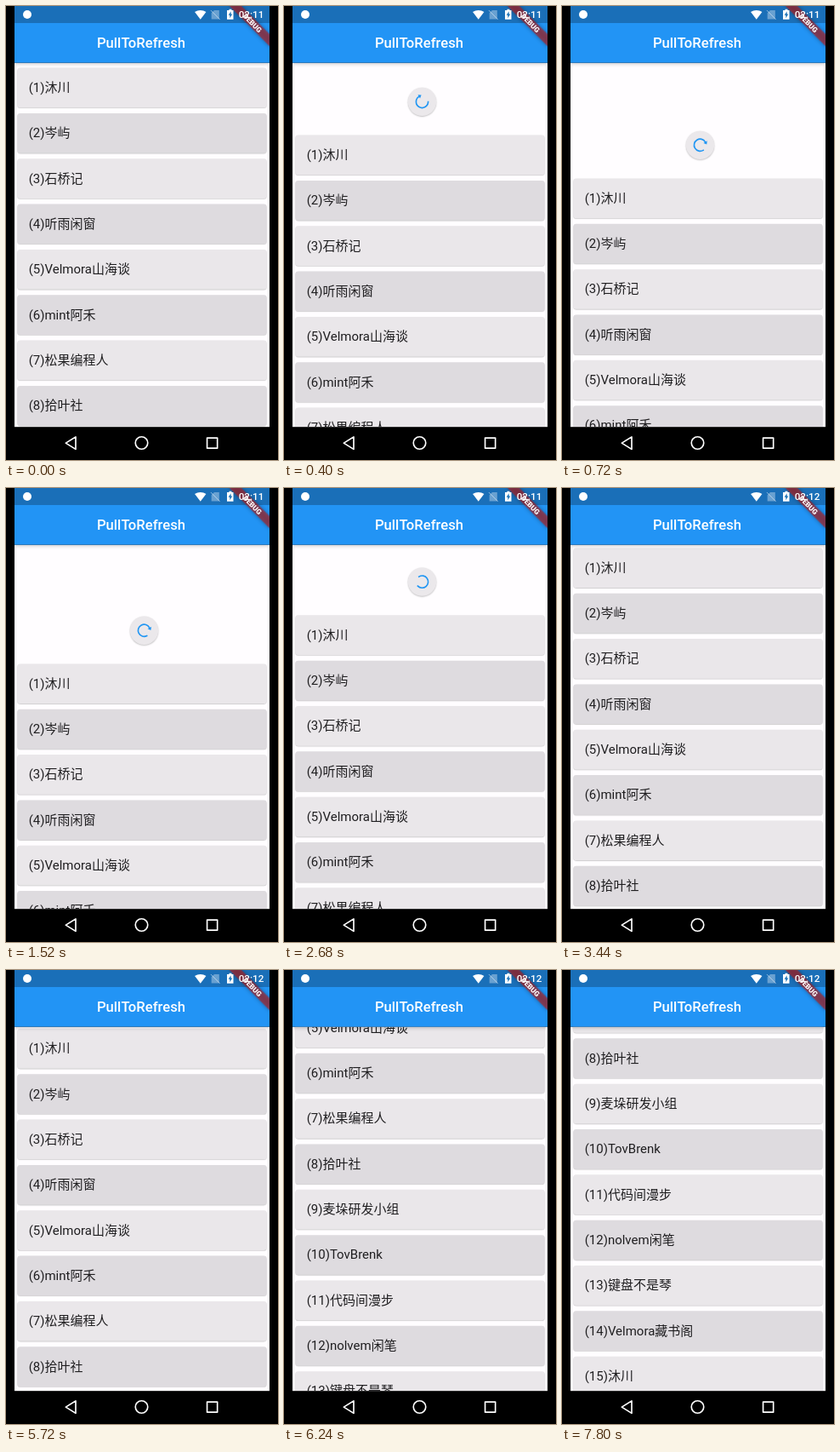
These frames come from a looping animation (320 by 533 pixels, 8000 ms). An HTML page:

```html
<!DOCTYPE html>
<html lang="zh-CN">
<head>
<meta charset="utf-8">
<title>PullToRefresh</title>
<style>
html, body { margin: 0; width: 100%; height: 100%; overflow: hidden; background: #000; }
/* 360 x 640 logical pixels shown at 5/6 scale */
#phone { position: absolute; left: 10px; top: 0; width: 360px; height: 640px; overflow: hidden;
  transform: scale(.833333); transform-origin: 0 0; background: #000;
  font-family: Roboto, "Noto Sans CJK SC", "Noto Sans CJK", "Noto Sans CJK JP", sans-serif; }
#view { position: absolute; top: 80px; width: 360px; height: 512.8px; overflow: hidden; background: #fffdff; }
#list { position: absolute; width: 100%; }
.card { height: 56px; margin: 4px 4px 8px; border-radius: 4px; background: #eae7ea; color: #1f1e20;
  box-shadow: 0 1px 1px #0002, 0 1px 2px #0001;
  padding-left: 16px; font-size: 18px; line-height: 56px; white-space: nowrap; }
.card:nth-child(even) { background: #dedbdf; }
#disc { position: absolute; left: 163.2px; top: -63.3px; width: 40px; height: 40px; border-radius: 50%;
  background: #ebe8eb; box-shadow: 0 1px 2px #0003, 0 1px 3px #0001; }
#bar { position: absolute; width: 360px; height: 56.4px; padding-top: 24px; background: #2294f5; color: #fff;
  font: 500 20px/56px Roboto, sans-serif; text-align: center; text-indent: -2.4px;
  box-shadow: 0 2px 4px #0002, 0 1px 8px #0002; }
svg { position: absolute; left: 0; top: 0; }
</style>
</head>
<body>
<div id="phone">
  <div id="view">
    <div id="list"></div>
    <div id="disc"><svg width="40" height="40" fill="none" stroke="#2196f3" stroke-width="2">
      <path id="arc" stroke-linecap="square"/><path id="head" fill="#2196f3" stroke="none"/>
    </svg></div>
  </div>
  <div id="bar">PullToRefresh</div>
  <svg width="360" height="640" fill="#fff">
    <rect width="360" height="24" fill="#000" opacity=".25"/>
    <g transform="translate(360) rotate(45)">
      <rect x="-40" y="28" width="80" height="12" fill="#b71c1c" fill-opacity=".63" style="filter:drop-shadow(0 0 3px #0008)"/>
      <text y="37.6" font-size="10.2" font-weight="900" text-anchor="middle">DEBUG</text>
    </g>
    <circle cx="18" cy="12" r="6"/>
    <path d="M262.5 19 270.5 8.5C266 5 259 5 254.5 8.5Z"/>
    <path d="M282 6H289V18.5H278V10Z" opacity=".35"/>
    <path d="M277 6 290 19" stroke="#fff" stroke-width="1.2" opacity=".5"/>
    <path d="M303 4.5H306.5V6H309V19H300V6H303Z"/>
    <path d="M305.5 7.5 302 13H304V17L307.5 11.5H305.5Z" fill="#1971b6"/>
    <text id="clock" x="352" y="17" font-size="14" font-weight="500" text-anchor="end"></text>
    <g fill="none" stroke="#fff" stroke-width="2" stroke-linejoin="round" transform="translate(-.6)">
      <path d="M87 607V624.5L73 615.7Z"/>
      <circle cx="180" cy="615.6" r="8.7"/>
      <rect x="272.5" y="608.5" width="14.5" height="14.5"/>
    </g>
  </svg>
</div>
<script>
const $ = id => document.getElementById(id);
const names = ['沐川', '岑屿', '石桥记', '听雨闲窗', 'Velmora山海谈', 'mint阿禾', '松果编程人', '拾叶社',
  '麦垛研发小组', 'TovBrenk', '代码间漫步', 'nolvem闲笔', '键盘不是琴', 'Velmora藏书阁', '沐川'];
names.forEach((name, i) => {
  const card = document.createElement('div');
  card.className = 'card';
  card.textContent = `(${i + 1})${name}`;
  $('list').append(card);
});

const LOOP = 8000, RELEASE = 1525, DONE = 3000, FULL_PULL = 136;
const linear = p => p;
const out = p => 1 - (1 - p) ** 2;
const outCubic = p => 1 - (1 - p) ** 3;
const inOut = p => p * p * (3 - 2 * p);

// time, list offset in stage pixels, easing towards that point
const keys = [
  [0, 2.4], [400, 81.3, linear], [840, 136.5, out], [1520, 136.7, linear],
  [2160, 79.3, outCubic], [3160, 79.3, linear], [3440, .4, inOut],
  [5680, .4, linear], [5720, -.2, linear], [6280, -240, out],
  [7520, -240, linear], [7800, -363, out], [LOOP, -363, linear]
];

function offsetAt(t) {
  const i = keys.findIndex(k => k[0] > t);
  const [t0, y0] = keys[i - 1], [t1, y1, ease] = keys[i];
  return y0 + (y1 - y0) * ease((t - t0) / (t1 - t0));
}

// cubic-bezier(.4, 0, .2, 1)
function fastOutSlowIn(x) {
  let lo = 0, hi = 1, s;
  for (let i = 0; i < 24; i++) {
    s = (lo + hi) / 2;
    if (1.2 * s * (1 - s) ** 2 + .6 * s * s * (1 - s) + s ** 3 < x) lo = s; else hi = s;
  }
  return 3 * s * s * (1 - s) + s ** 3;
}

const clamp = x => Math.min(1, Math.max(0, x));

function drawSpinner(t, offset) {
  const pulling = t < RELEASE;
  const pull = clamp(offset / FULL_PULL);
  const cycle = pulling ? pull / 2 : .5 + (Math.min(t, DONE) - RELEASE) / 1333;
  const step = Math.floor(cycle), p = cycle - step;
  const grow = fastOutSlowIn(clamp(p * 2)), shrink = fastOutSlowIn(clamp(p * 2 - 1));
  const start = Math.PI * (-.5 + 1.5 * shrink + 1.7 * p - .8 * step);
  const sweep = Math.max(Math.PI * 1.5 * (grow - shrink), .001);
  const end = start + sweep, c = 20, r = 8.5, ux = Math.cos(end), uy = Math.sin(end);
  const at = (a, rad) => `${c + Math.cos(a) * rad} ${c + Math.sin(a) * rad}`;
  $('arc').setAttribute('d', `M${at(start, r)}A${r} ${r} 0 ${+(sweep > Math.PI)} 1 ${at(end, r)}`);
  const size = pulling ? clamp(pull * 2) : 0;
  $('head').setAttribute('d', `M${at(end, r - 3 * size)}L${at(end, r + 3 * size)}L` +
    `${c + ux * r - uy * 4 * size} ${c + uy * r + ux * 4 * size}Z`);
}

function frame(now) {
  const t = now % LOOP, offset = offsetAt(t);
  const shift = `translateY(${offset * 1.2}px)`;
  $('list').style.transform = shift;
  $('disc').style.transform = shift;
  drawSpinner(t, offset);
  $('clock').textContent = t < 3160 ? '02:11' : '02:12';
  requestAnimationFrame(frame);
}
frame(0);
</script>
</body>
</html>
```
